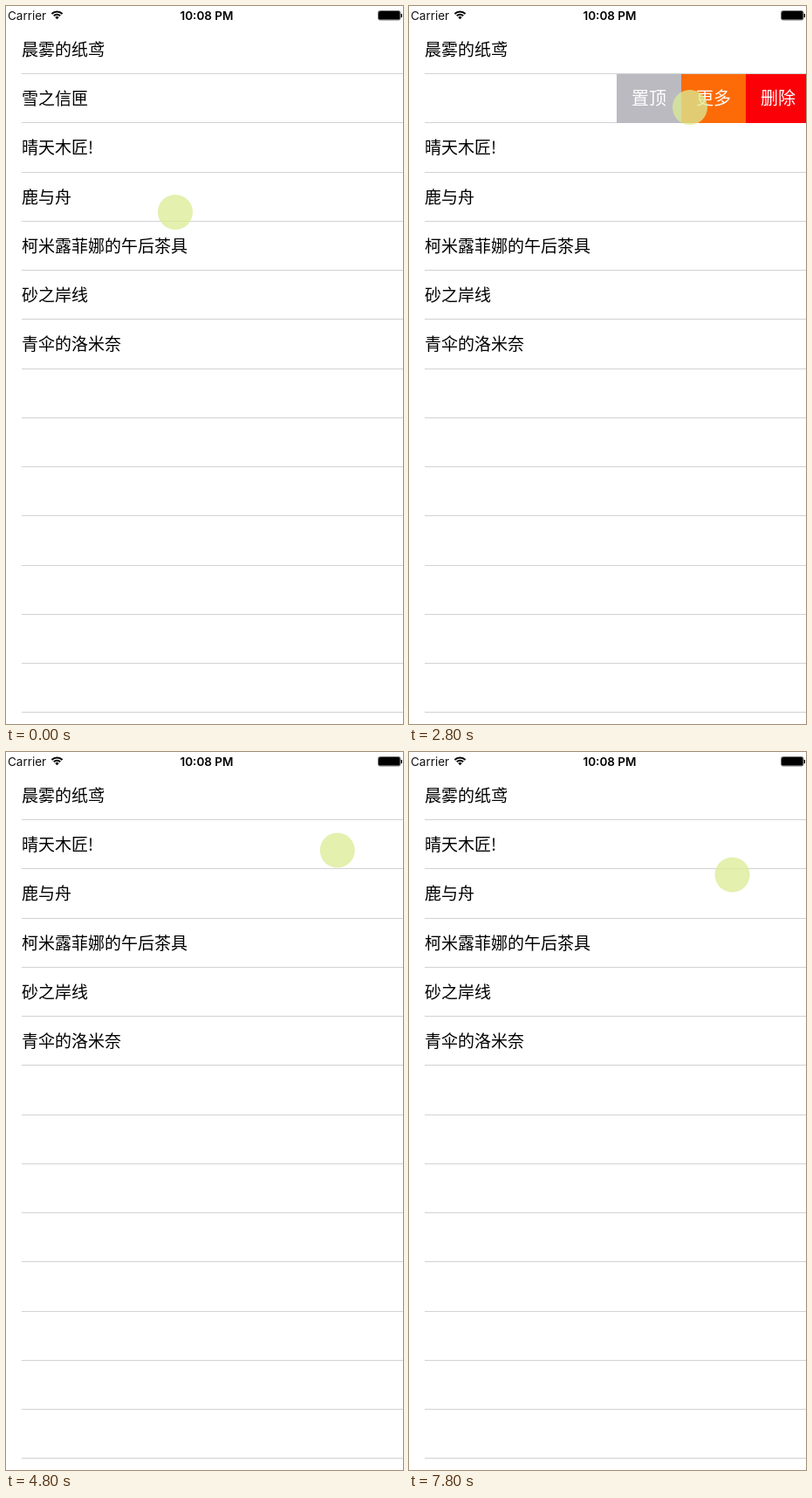
An HTML page with a canvas for the animation above (8000 ms loop, 455 by 822 pixels).

```html
<!DOCTYPE html>
<html lang="zh-CN">
<head>
<meta charset="utf-8">
<title>Swipe actions</title>
<style>
html, body { margin: 0; width: 100%; height: 100%; overflow: hidden; background: #fff; }
canvas { display: block; width: 455px; height: 822px; }
</style>
</head>
<body>
<canvas id="stage"></canvas>
<script>
const W = 455, H = 822, LOOP = 8000, STEP = 200;
const ROW = 56.23, INSET = 18, LAST_LINE = 13;
const CELL_TOP = 78, CELL_HEIGHT = 56, BUTTON = 74;
const DELETED = 4600;
const CJK = '"Noto Sans CJK SC", "Noto Sans CJK", sans-serif';
const LATIN = 'Inter, sans-serif';

const titles = ['晨雾的纸鸢', '雪之信匣', '晴天木匠!', '鹿与舟',
  '柯米露菲娜的午后茶具', '砂之岸线', '青伞的洛米奈'];
const actions = [
  { label: '置顶', color: '#bcbac1' },
  { label: '更多', color: '#fd6b08' },
  { label: '删除', color: '#fc0007' }
];
const OPEN = 217;

// The pointer rests between these eased moves
const origin = { x: 194, y: 236 };
const moves = [
  { from: 0, to: 800, x: 280, y: 70 },
  { from: 800, to: 1200, x: 329, y: 100 },
  { from: 1400, to: 2000, x: 129, y: 101 },
  { from: 2000, to: 2800, x: 322, y: 116 },
  { from: 2800, to: 3600, x: 422, y: 100 },
  { from: 4400, to: 5000, x: 365, y: 117 },
  { from: 5200, to: 5800, x: 128, y: 114 },
  { from: 5800, to: 6600, x: 355, y: 119 },
  { from: 6600, to: 6800, x: 355, y: 110 },
  { from: 7400, to: 7800, x: 370.5, y: 140.5 }
];

const canvas = document.getElementById('stage');
const ctx = canvas.getContext('2d');
const dpr = window.devicePixelRatio || 1;
canvas.width = W * dpr;
canvas.height = H * dpr;

// Smooth 0..1 between two times
function ramp(t, from, to) {
  const u = Math.min(1, Math.max(0, (t - from) / (to - from)));
  return u * u * (3 - 2 * u);
}

function pointerAt(t) {
  let { x, y } = origin;
  for (const m of moves) {
    const p = ramp(t, m.from, m.to);
    x += (m.x - x) * p;
    y += (m.y - y) * p;
  }
  return { x, y };
}

function openAt(t) {
  if (t < DELETED) return OPEN * ramp(t, 1548, 2038);
  return OPEN * (ramp(t, 5369, 5685) - ramp(t, 6800, 7200));
}

function collapseAt(t) {
  return t < DELETED ? ROW * ramp(t, 4080, 4480) : 0;
}

function text(str, x, y, font, color, align = 'left') {
  ctx.font = font;
  ctx.fillStyle = color;
  ctx.textAlign = align;
  ctx.fillText(str, x, y);
}

function disc(x, y, r, color) {
  ctx.fillStyle = color;
  ctx.beginPath();
  ctx.arc(x, y, r, 0, Math.PI * 2);
  ctx.fill();
}

function drawStatus() {
  text('Carrier', 2, 16, '400 13.5px ' + LATIN, '#111');
  text('10:08 PM', 230, 16, '600 13.5px ' + LATIN, '#000', 'center');

  const up = [-Math.PI * 0.75, -Math.PI * 0.25];
  ctx.strokeStyle = ctx.fillStyle = '#000';
  ctx.lineWidth = 2;
  for (const r of [5.2, 8.6]) {
    ctx.beginPath();
    ctx.arc(58.5, 15, r, ...up);
    ctx.stroke();
  }
  ctx.beginPath();
  ctx.moveTo(58.5, 15.3);
  ctx.arc(58.5, 15, 3, ...up);
  ctx.fill();

  ctx.strokeStyle = '#777';
  ctx.lineWidth = 1;
  ctx.beginPath();
  ctx.roundRect(426.5, 5.5, 25.5, 10.5, 2);
  ctx.stroke();
  ctx.beginPath();
  ctx.roundRect(427, 6, 24.5, 9.5, 1.5);
  ctx.fill();
  ctx.fillRect(452.6, 9, 1.4, 4);
}

function drawLine(i, shift = 0) {
  ctx.fillStyle = '#d2d1d4';
  ctx.fillRect(INSET, Math.floor(77.7 + ROW * i - shift), W - INSET, 1);
}

function drawLines(shift) {
  const moving = shift > 0;
  for (let i = 0; i <= LAST_LINE; i++) {
    if (!moving || i === 0 || i >= 6) drawLine(i);
  }
  // Half of the sliding separators are covered while rows close up
  if (moving) for (let i = 2; i <= 6; i += 2) drawLine(i, shift);
}

function drawActions(open, height) {
  if (open <= 0) return;
  ctx.save();
  ctx.beginPath();
  ctx.rect(Math.round(W - open), CELL_TOP, open + 1, height);
  ctx.clip();
  actions.forEach(({ label, color }, i) => {
    const x = W - OPEN + i * BUTTON;
    ctx.fillStyle = color;
    ctx.fillRect(x, CELL_TOP, BUTTON, height);
    text(label, x + 17, CELL_TOP + height / 2 + 7, '300 20px ' + CJK, '#fff');
  });
  ctx.restore();
}

function drawRows(t, open, shift) {
  const rows = t < DELETED ? titles : titles.filter((_, i) => i !== 1);
  rows.forEach((title, i) => {
    const x = INSET - (i === 1 ? open : 0);
    const y = 57 + ROW * i - (i > 1 ? shift : 0);
    text(title, x, y, '400 19px ' + CJK, '#000');
  });
}

function draw(t) {
  const open = openAt(t);
  const shift = collapseAt(t);
  const pointer = pointerAt(t);

  ctx.setTransform(dpr, 0, 0, dpr, 0, 0);
  ctx.fillStyle = '#fff';
  ctx.fillRect(0, 0, W, H);
  drawLines(shift);
  drawActions(open, Math.round(CELL_HEIGHT - shift));
  drawRows(t, open, shift);
  drawStatus();
  disc(pointer.x, pointer.y, 20, 'rgba(219,235,149,0.76)');
}

function tick() {
  const t = performance.now() % LOOP;
  draw(Math.floor(t / STEP) * STEP);
  requestAnimationFrame(tick);
}
tick();
</script>
</body>
</html>
```
